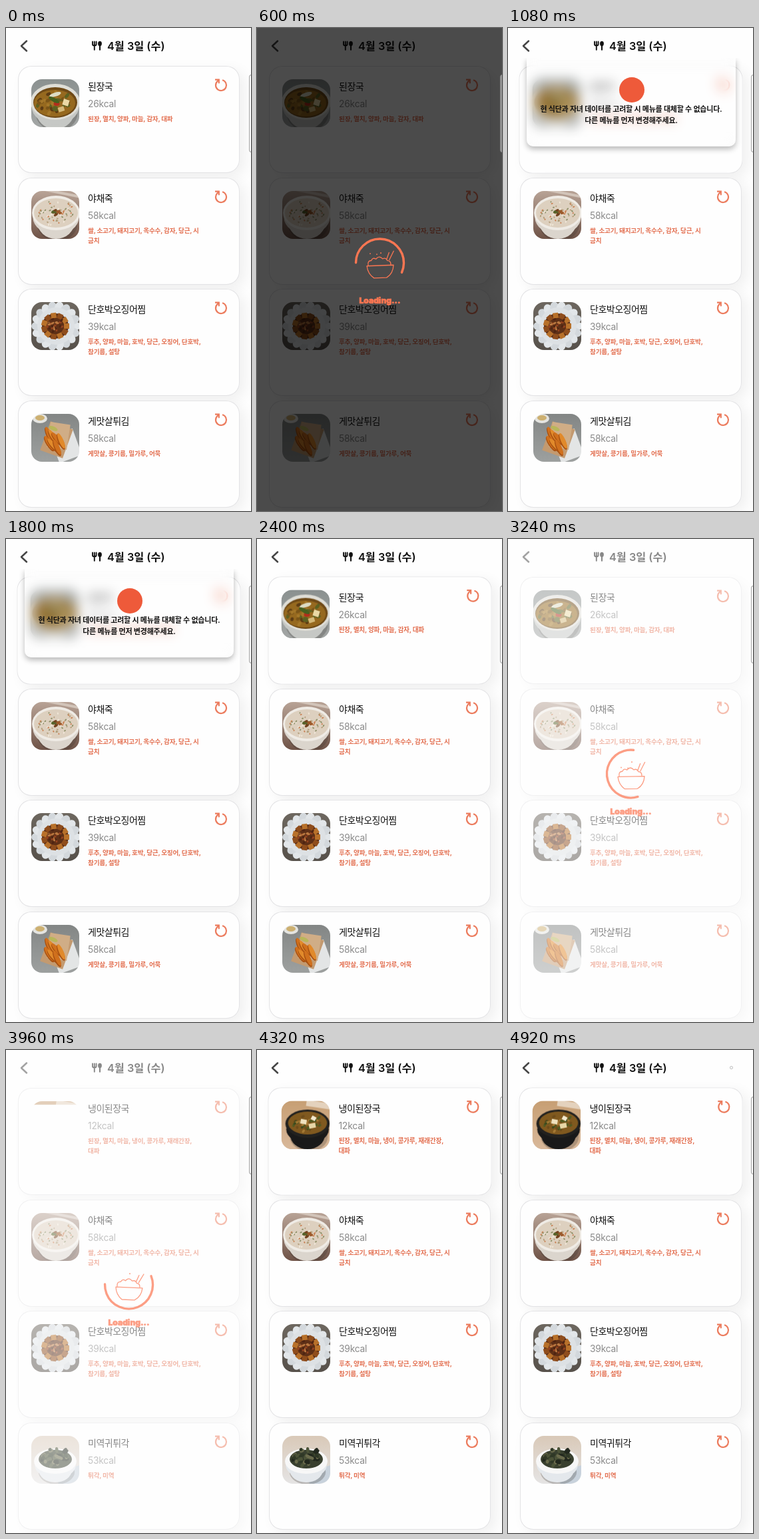
Animation of 368 by 726 pixels, one loop 5040 ms. Source, as an HTML page with a canvas:

```html
<!DOCTYPE html>
<html lang="ko">
<head>
<meta charset="utf-8">
<title>Menu</title>
<style>
  html, body { margin: 0; width: 100%; height: 100%; overflow: hidden; background: #fefefe; }
  body { font-family: Inter, "Noto Sans CJK KR", "Noto Sans CJK", sans-serif; }
  #stage { position: relative; width: 368px; height: 726px; overflow: hidden; color: #111; white-space: nowrap; }
  #stage * { position: absolute; box-sizing: border-box; }
  #stage br { position: static; }
  .icon { left: 0; top: 0; width: 368px; height: 60px; }
  .date { left: 152px; top: 15px; font: 600 16.3px/24px Inter, "Noto Sans CJK KR", "Noto Sans CJK", sans-serif; }
  .card { left: 18px; width: 333px; height: 161px; border-radius: 20px; background: #fefefe;
          box-shadow: inset 0 0 0 1px #e3e3e5, 8px 6px 20px rgba(0, 0, 0, .06); }
  .card canvas { left: 20px; top: 20px; border-radius: 16px; }
  .name { left: 105px; top: 20px; font-size: 14px; line-height: 21px; letter-spacing: -.5px; }
  .kcal { left: 105px; top: 47px; font-size: 13.8px; line-height: 20px; letter-spacing: -.2px; color: #8a8a8a; }
  .parts { left: 105px; top: 71.5px; font-size: 9.6px; line-height: 15.4px; font-weight: 700; letter-spacing: -.2px; color: #e36f50; }
  .redo { left: 293px; top: 17px; width: 24px; height: 24px; }
  #toast { left: 28px; top: 45px; width: 314px; height: 133px; border-radius: 0 0 10px 10px; background: rgba(255, 255, 255, .1);
           backdrop-filter: blur(9px); text-align: center; font-size: 11px; line-height: 17px; font-weight: 700; letter-spacing: -.2px; }
  #toast i { left: 139px; top: 29px; width: 38px; height: 38px; border-radius: 50%; background: #ee5a3a; }
  #toast p { margin: 0; left: 0; top: 69px; width: 100%; }
  #shade { left: 28px; top: 45px; width: 314px; height: 133px; border-radius: 0 0 10px 10px;
           box-shadow: 0 4px 9px rgba(0, 0, 0, .28); clip-path: inset(0 -20px -20px); }
  #veil { left: 0; top: 0; width: 368px; height: 726px; }
  #loader { left: 135px; top: 303px; width: 100px; height: 130px; color: #fc7652; }
  #loader p { margin: 0; top: 98px; left: 0; width: 99px; text-align: center; font-size: 12px; line-height: 18px;
              font-weight: 900; -webkit-text-stroke: .7px #fc7652; }
  #bar { left: 365px; top: 70px; width: 8px; height: 117px; border-radius: 4px;
         background: rgba(255, 255, 255, .4); border: 1px solid rgba(140, 140, 140, .8); }
  #dot { left: 333px; top: 24px; width: 5px; height: 5px; border-radius: 50%; border: 1px solid #bbb; }
</style>
</head>
<body>
<div id="stage">
  <svg class="icon" viewBox="0 0 368 60" fill="none" stroke="#111" stroke-linecap="round">
    <path d="M31 19.500l-8 7.500 8 7.500" stroke="#444" stroke-width="2.500" stroke-linejoin="round"/>
    <path d="M130 20.500v4q0 2 2.800 2t2.800-2v-4M132.800 20.500v12.300" stroke-width="1.900"/>
    <path d="M141 26v6.800" stroke-width="2.100"/>
    <ellipse cx="141" cy="23.500" rx="2.900" ry="3.700" fill="#111" stroke="none"/>
  </svg>
  <div class="date">4월 3일 (수)</div>
  <div id="cards"></div>
  <div id="dot"></div>
  <div id="shade"></div>
  <div id="toast"><i></i><p>현 식단과 자녀 데이터를 고려할 시 메뉴를 대체할 수 없습니다.<br>다른 메뉴를 먼저 변경해주세요.</p></div>
  <div id="veil"></div>
  <div id="loader"><canvas width="100" height="100"></canvas><p>Loading...</p></div>
  <div id="bar"></div>
</div>
<script>
const LOOP = 5040, SIZE = 72, ORANGE = '#fc7652';
const $ = id => document.getElementById(id);
const clamp = v => Math.max(0, Math.min(1, v));
const ramp = (t, a, b) => clamp((t - a) / (b - a));
const within = (t, a, b) => t >= a && t < b;

// ---- photo helpers
function backdrop(g, top, bottom) {
  const fill = g.createLinearGradient(0, 0, 0, SIZE);
  fill.addColorStop(0, top);
  fill.addColorStop(1, bottom);
  g.fillStyle = fill;
  g.fillRect(0, 0, SIZE, SIZE);
}
function oval(g, color, x, y, rx, ry, turn = 0) {
  g.fillStyle = color;
  g.beginPath();
  g.ellipse(x, y, rx, ry, turn, 0, 7);
  g.fill();
}
function quad(g, color, x, y, w, h, turn = 0) {
  g.save();
  g.translate(x, y);
  g.rotate(turn);
  g.fillStyle = color;
  g.fillRect(-w / 2, -h / 2, w, h);
  g.restore();
}
function scatter(g, colors, n, x, y, rx, ry, size) {
  let seed = 7;
  const rand = () => (seed = seed * 16807 % 2147483647) / 2147483647;
  rand();
  for (let i = 0; i < n; i++) {
    const a = rand() * 6.28, d = Math.sqrt(rand());
    oval(g, colors[i % colors.length], x + rx * d * Math.cos(a), y + ry * d * Math.sin(a),
      size * (.6 + rand() * .6), size * .6, rand() * 3);
  }
}
function bowl(g, x, y, rx, ry, depth, rim, side) {
  oval(g, 'rgba(50,45,40,.25)', x + 2, y + depth + 3, rx * .85, ry);
  oval(g, side, x, y + depth, rx * .78, ry);
  oval(g, side, x, y + depth / 2, rx * .96, ry);
  oval(g, rim, x, y, rx, ry);
}

// ---- photos
function stew(g) {
  backdrop(g, '#8b9190', '#a3a6a5');
  bowl(g, 36, 34, 37, 27, 14, '#dfded7', '#c6c8c5');
  oval(g, '#6f4a17', 36, 35, 33, 23);
  oval(g, '#96691f', 35, 36, 31, 20);
  scatter(g, ['#5c6122', '#a5782a', '#5d3c14', '#7b5518'], 34, 34, 35, 27, 17, 4);
  quad(g, '#ead9a6', 52, 35, 9, 9, .3);
  quad(g, '#d3b97a', 45, 45, 9, 7, -.3);
  oval(g, '#b32d1c', 38, 37, 4.5, 3);
  oval(g, '#dcdcc4', 36, 23, 9, 3, -.3);
  oval(g, '#46601f', 34, 31, 9, 3, .5);
}
function porridge(g) {
  backdrop(g, '#b8a396', '#6f5347');
  quad(g, '#d2c4b9', 50, 4, 60, 4, .2);
  bowl(g, 37, 33, 36, 26, 13, '#efebe5', '#dbd5cd');
  oval(g, '#ddd0bf', 37, 33, 33, 22);
  scatter(g, ['#b6a07e', '#f0e7d8', '#c98255', '#8e9068'], 60, 37, 33, 29, 19, 1.7);
  scatter(g, ['#73431f', '#9d5a2b', '#56652c'], 12, 38, 32, 7, 4, 3);
}
function squid(g) {
  backdrop(g, '#6d675f', '#57514b');
  for (let i = 0; i < 18; i++) {
    const a = i * Math.PI / 9;
    oval(g, i % 2 ? '#d3d8dc' : '#e2e6e9', 37 + 27 * Math.cos(a), 36 + 27 * Math.sin(a), 10, 7, a);
  }
  oval(g, '#dde1e4', 37, 36, 28, 28);
  oval(g, '#5e3017', 36, 36, 20, 19);
  for (let i = 0; i < 11; i++) {
    const a = i * .571;
    quad(g, i % 2 ? '#8f4d1c' : '#b8712a', 36 + 17 * Math.cos(a), 36 + 16 * Math.sin(a), 8, 8, a);
  }
  scatter(g, ['#4f2412', '#93421f', '#b97840'], 26, 36, 34, 13, 11, 2.5);
}
function fritters(g) {
  backdrop(g, '#838685', '#9da09f');
  quad(g, '#e3e5e5', 52, 48, 36, 42, -.35);
  quad(g, '#c39a70', 38, 39, 36, 46, .35);
  quad(g, '#d0ad86', 41, 33, 30, 38, .15);
  oval(g, '#e4e4e0', 13, 7, 11, 7);
  oval(g, '#cdb071', 13, 6, 7, 4);
  for (let i = 0; i < 7; i++) {
    g.save();
    g.translate(27 + i % 4 * 6, 31 + i * 3.2);
    g.rotate(1.15 - i % 3 * .15);
    oval(g, '#a75012', 1, 1, 13, 4);
    oval(g, i % 2 ? '#e18a2b' : '#d0701d', 0, 0, 12.5, 3.4);
    g.restore();
  }
  oval(g, '#b8b75a', 33, 22, 7, 3, .4);
}
function herbSoup(g) {
  backdrop(g, '#c79f74', '#d9b99b');
  quad(g, '#e4d2bd', 57, 6, 40, 9, .15);
  bowl(g, 39, 34, 33, 21, 17, '#22211f', '#191919');
  oval(g, '#80591f', 39, 33, 29, 17);
  scatter(g, ['#515b22', '#a57a35', '#6d4c1b', '#3c4a1e'], 30, 39, 33, 23, 13, 3);
  quad(g, '#efe3bf', 33, 31, 9, 7, .2);
  quad(g, '#e8d7a7', 46, 37, 10, 7, -.2);
  quad(g, '#f3ead0', 48, 26, 7, 6, .5);
}
function seaweed(g) {
  backdrop(g, '#d9c9b8', '#e5e4e4');
  quad(g, '#c8d2dc', 58, 60, 40, 22, -.3);
  bowl(g, 36, 38, 32, 19, 13, '#f7f7f7', '#e4e8ec');
  oval(g, '#39402f', 36, 35, 25, 14);
  scatter(g, ['#22281e', '#4b5338', '#6a6b4c', '#2f3826'], 38, 36, 32, 22, 13, 4);
}

// ---- cards
const dish = (name, kcal, parts, photo) => ({ name, kcal, parts, photo });
const rice = dish('야채죽', 58, '쌀, 소고기, 돼지고기, 옥수수, 감자, 당근, 시<br>금치', porridge);
const steamed = dish('단호박오징어찜', 39, '후추, 양파, 마늘, 호박, 당근, 오징어, 단호박,<br>참기름, 설탕', squid);
const menus = [
  [dish('된장국', 26, '된장, 멸치, 양파, 마늘, 감자, 대파', stew), rice, steamed,
   dish('게맛살튀김', 58, '게맛살, 콩기름, 밀가루, 어묵', fritters)],
  [dish('냉이된장국', 12, '된장, 멸치, 마늘, 냉이, 콩가루, 재래간장,<br>대파', herbSoup), rice, steamed,
   dish('미역귀튀각', 53, '튀각, 미역', seaweed)]
];
const redoIcon = `<svg class="redo" viewBox="-12 -12 24 24" fill="none" stroke="#ec7c5e" stroke-width="2.200">
  <path d="M2-7.700A8 8 0 1 1-5.600-5.700L-3.300-8M-9-8.300h5.800v5.500"/></svg>`;

const cards = menus[0].map((_, i) => {
  const el = document.createElement('div');
  el.className = 'card';
  el.style.top = Math.round(57 + 167.6 * i) + 'px';
  el.innerHTML = `<canvas width="${SIZE}" height="${SIZE}"></canvas><div class="name"></div>
    <div class="kcal"></div><div class="parts"></div>${redoIcon}`;
  $('cards').append(el);
  return el;
});
const firstPhoto = cards[0].querySelector('canvas');

let shown = -1;
function showMenu(k) {
  if (k === shown) return;
  shown = k;
  menus[k].forEach((m, i) => {
    const part = s => cards[i].querySelector(s);
    part('.name').textContent = m.name;
    part('.kcal').textContent = m.kcal + 'kcal';
    part('.parts').innerHTML = m.parts;
    m.photo(part('canvas').getContext('2d'));
  });
}

// ---- loader
const ring = $('loader').firstChild.getContext('2d');
function drawLoader(t) {
  const g = ring, turn = Math.PI + (t - 600) * .36845 * Math.PI / 180;
  const phase = t % 977 / 977;
  g.clearRect(0, 0, 100, 100);
  g.strokeStyle = g.fillStyle = ORANGE;
  g.lineCap = g.lineJoin = 'round';
  g.lineWidth = 3.4;
  g.beginPath();
  g.arc(49.5, 50, 36, turn, turn + 3.55);
  g.stroke();

  g.save();
  g.translate(50, 53);
  g.rotate(.05 * Math.cos(phase * 6.283));
  g.lineWidth = 1.3;
  g.stroke(new Path2D('M-20 1H20Q19 14 9 19.500H-10Q-19 13-20 1Z'));
  g.stroke(new Path2D('M-18 0Q-19-7-13-7Q-11-12-6-9Q-1-15 4-9Q9-11 11-6Q16-6 16 0'));
  g.stroke(new Path2D('M10-8L14-18M14-7L21-20'));
  g.restore();

  oval(g, ORANGE, 51, 34 - 2 * Math.sin(phase * 6.283), 1, 1);
  if (phase > .3 && phase < .85) {
    const lift = Math.sin((phase - .3) / .55 * Math.PI) * 5;
    oval(g, ORANGE, 35, 41 - lift, .9, .9);
    oval(g, ORANGE, 45, 42 - lift, .9, .9);
  }
}

// ---- timeline
function render(t) {
  showMenu(t < 3840 ? 0 : 1);

  const dark = within(t, 180, 780) || within(t, 2520, 2940);
  const pale = ramp(t, 3060, 3240) * (1 - ramp(t, 3970, 4150));
  $('veil').style.background = dark ? 'rgba(0,0,0,.7)' : `rgba(255,255,255,${.5 * pale})`;
  $('loader').style.opacity = dark ? 1 : .7 * pale;
  if (dark || pale) drawLoader(t);

  const hover = within(t, 780, 2520) || within(t, 2940, 3120) || t >= 4150;
  cards[0].style.transform = hover ? 'scale(1.01)' : 'none';
  const hidden = t < 3840 ? 0 : SIZE - 5 - 67 * ramp(t, 3960, 4170);
  firstPhoto.style.clipPath = `inset(0 0 ${hidden}px 0)`;

  const rise = 1 - (1 - ramp(t, 820, 1070)) ** 3;
  const y = -195 * (1 - rise) - 195 * ramp(t, 2020, 2340) ** 2;
  for (const id of ['toast', 'shade']) {
    $(id).style.display = within(t, 820, 2340) ? 'block' : 'none';
    $(id).style.transform = `translateY(${y}px)`;
  }
  $('dot').style.opacity = t >= 4860 ? 1 : 0;
}

const start = performance.now();
function tick() {
  render((performance.now() - start) % LOOP);
  requestAnimationFrame(tick);
}
tick();
</script>
</body>
</html>
```
